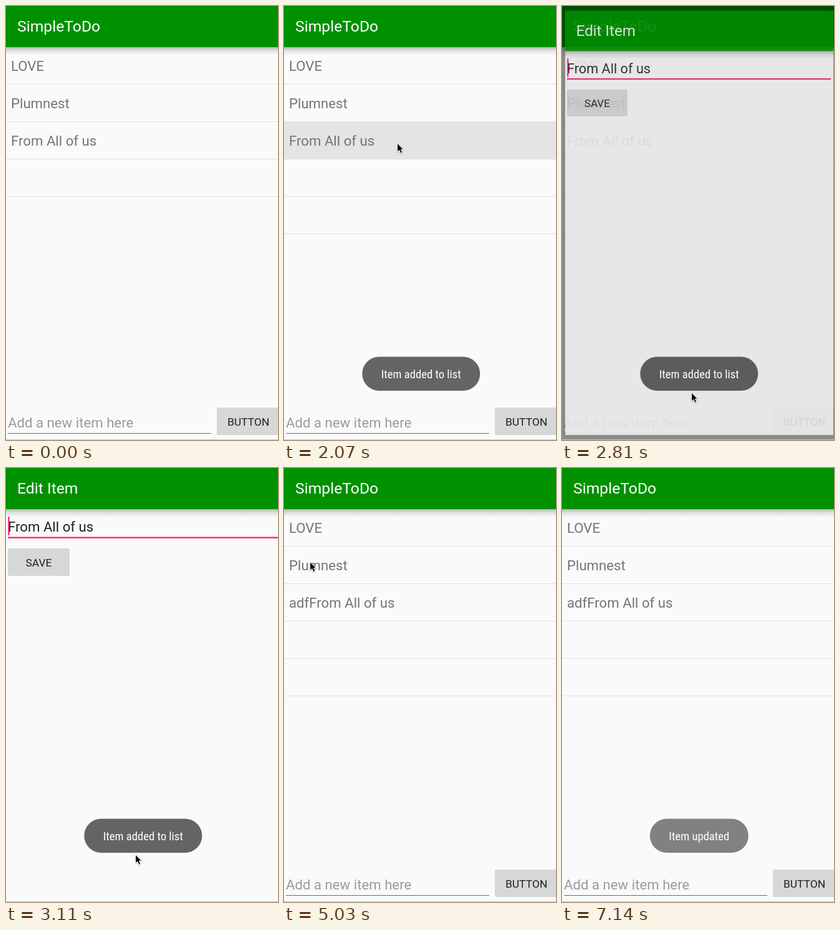
An HTML page that plays this animation: 436 px wide and 696 px high, repeating every 7.24 s.

```html
<!DOCTYPE html>
<html lang="en">
<head>
<meta charset="utf-8">
<title>SimpleToDo</title>
<style>
html, body { margin: 0; width: 100%; height: 100%; overflow: hidden; background: #fafafa; }
svg { display: block; width: 436px; height: 696px; font-family: Roboto, sans-serif; }
text { white-space: pre; }
.title { font-size: 24.7px; fill: #fff; }
.item { font-size: 22.2px; fill: #757575; }
.hint { font-size: 22.2px; fill: #9b9b9b; }
.field { font-size: 22.2px; fill: #212121; }
.label { font-size: 17.4px; fill: #212121; text-anchor: middle; }
.toast { font: 18.6px "Roboto Condensed", Roboto, sans-serif; font-stretch: 75%; fill: #fff; text-anchor: middle; }
.rule { fill: #e1e1e1; }
.accent { fill: #f81c7c; }
</style>
</head>
<body>
<svg viewBox="0 0 436 696">
  <defs>
    <linearGradient id="shade" x1="0" y1="0" x2="0" y2="1">
      <stop offset="0" stop-color="#000" stop-opacity=".27"/>
      <stop offset=".45" stop-color="#000" stop-opacity=".1"/>
      <stop offset="1" stop-color="#000" stop-opacity="0"/>
    </linearGradient>
    <g id="page">
      <rect width="440" height="696" fill="#fafafa"/>
      <rect y="66" width="440" height="13" fill="url(#shade)"/>
      <rect width="440" height="66" fill="#009100"/>
    </g>
  </defs>

  <g id="list">
    <use href="#page"/>
    <text class="title" x="18" y="41">SimpleToDo</text>
    <rect id="pressedRow" y="185" width="440" height="61" fill="#e4e4e4"/>
    <g id="rules"></g>
    <text class="item" x="8" y="104">LOVE</text>
    <text class="item" x="8" y="164">Plumnest</text>
    <text class="item" id="edited" x="8" y="224"></text>
    <text class="hint" x="3" y="676">Add a new item here</text>
    <rect x="3" y="685" width="326" height="1" fill="#6c6c6c"/>
    <rect id="addBtn" x="338" y="644" width="99" height="44" rx="2"/>
    <text class="label" x="388.5" y="673">BUTTON</text>
  </g>
  <rect id="dim" width="436" height="696"/>

  <g id="edit">
    <use href="#page" height="695"/>
    <text class="title" x="18" y="41">Edit Item</text>
    <text class="field" id="field" x="3" y="102"></text>
    <rect class="accent" x="3" y="110.5" width="433" height="2.3"/>
    <rect class="accent" id="caret" y="78" width="2.2" height="30"/>
    <rect id="saveBtn" x="3" y="129" width="99" height="44" rx="2"/>
    <text class="label" x="52.5" y="158">SAVE</text>
  </g>
  <rect y="695" width="436" height="1" fill="#c8c8c8"/>

  <g id="toast">
    <rect id="pill" y="562.5" height="54.5" rx="27.2" fill-opacity=".6"/>
    <text class="toast" id="message" x="219.8" y="597"></text>
  </g>
  <path id="pointer" d="M0 0V14L3.2 11L5.6 16.2L8.2 15L5.9 10H10Z"
        stroke="#fff" stroke-width="1" stroke-linejoin="round"
        style="filter:drop-shadow(0 1px 1px rgba(0,0,0,.25))"/>
</svg>
<script>
const LOOP = 7240, STEP = 148, LAST = 7140;
const ITEM = "From All of us", TYPED = "adf";
const $ = id => document.getElementById(id);
const set = (id, attrs) => {
  for (const name in attrs) $(id).setAttribute(name, attrs[name]);
};
const show = (id, on) => set(id, { display: on ? "inline" : "none" });

// Each track holds [step, values...]
const pointerPath = [
  [3, 420, 685], [4, 392, 667], [6, 390, 665], [7, 372, 628], [8, 300, 470],
  [9, 215.5, 281.5], [10, 189, 243], [11, 183, 225], [12, 181.5, 220], [15, 181.5, 220],
  [16, 183, 260], [17, 190, 380], [18, 200, 530], [19, 207.5, 620],
  [27, 207.5, 620], [28, 190, 570], [29, 130, 380], [30, 65, 200], [31, 44, 152],
  [35, 41, 150], [36, 95, 225], [37, 180, 380], [38, 226.5, 458.5],
  [41, 226.5, 458.5], [42, 315, 569], [43, 346, 630], [44, 357, 682]
];
const toastAlpha = [
  [7, 0], [8, .35], [9, .71], [10, .88], [11, .96], [12, 1], [23, 1],
  [24, .75], [25, .35], [26, 0], [35, 0], [36, .35], [37, .7], [38, .96],
  [48, .96], [49, .8]
];
// opacity, scale, backdrop dimming
const editPage = [
  [17, 0, .9, 0], [18, .4, .94, .25], [19, .83, .977, .45], [20, .98, .997, .5],
  [21, 1, 1, .5], [32, 1, 1, 0], [33, .5, 1, 0], [34, 0, 1, 0]
];

function sample(track, k) {
  const i = track.findIndex(p => p[0] >= k);
  if (i < 0) return track[track.length - 1].slice(1);
  if (i === 0) return track[0].slice(1);
  const a = track[i - 1], b = track[i];
  const f = (k - a[0]) / (b[0] - a[0]);
  return a.slice(1).map((v, j) => v + (b[j + 1] - v) * f);
}

const buttonFill = pressed => pressed ? "#c4c5c5" : "#d6d7d7";

function draw(t) {
  const k = t >= LAST ? 49 : Math.min(48, Math.floor((t + 9) / STEP));

  const rows = k >= 6 ? 5 : 4;
  for (let i = 0; i < 5; i++) set("rule" + i, { opacity: i < rows ? 1 : 0 });
  show("pressedRow", k >= 14 && k <= 16);
  $("edited").textContent = (k >= 30 ? TYPED : "") + ITEM;
  set("addBtn", { fill: buttonFill(k === 5) });

  const [alpha, scale, dim] = sample(editPage, k);
  show("edit", alpha > 0);
  set("dim", { opacity: dim });
  set("edit", {
    opacity: alpha,
    transform: `translate(220 346) scale(${scale}) translate(-220 -346)`
  });
  const typed = TYPED.slice(0, Math.max(0, k - 21));
  $("field").textContent = typed + ITEM;
  const advance = typed ? $("field").getSubStringLength(0, typed.length) : 0;
  set("caret", { x: 3.3 + advance });
  set("saveBtn", { fill: buttonFill(k === 31 || k === 32) });

  const updated = k > 30, width = updated ? 158 : 189;
  $("message").textContent = updated ? "Item updated" : "Item added to list";
  set("pill", { x: 219.8 - width / 2, width });
  set("toast", { opacity: sample(toastAlpha, k)[0] });

  show("pointer", k >= 3 && k <= 44);
  set("pointer", { transform: `translate(${sample(pointerPath, k)})` });
}

$("rules").innerHTML = [0, 1, 2, 3, 4].map(i =>
  `<rect class="rule" id="rule${i}" y="${125 + 60 * i}" width="440" height="1"/>`).join("");

const start = performance.now();
function tick() {
  draw((performance.now() - start) % LOOP);
  requestAnimationFrame(tick);
}
tick();
</script>
</body>
</html>
```
